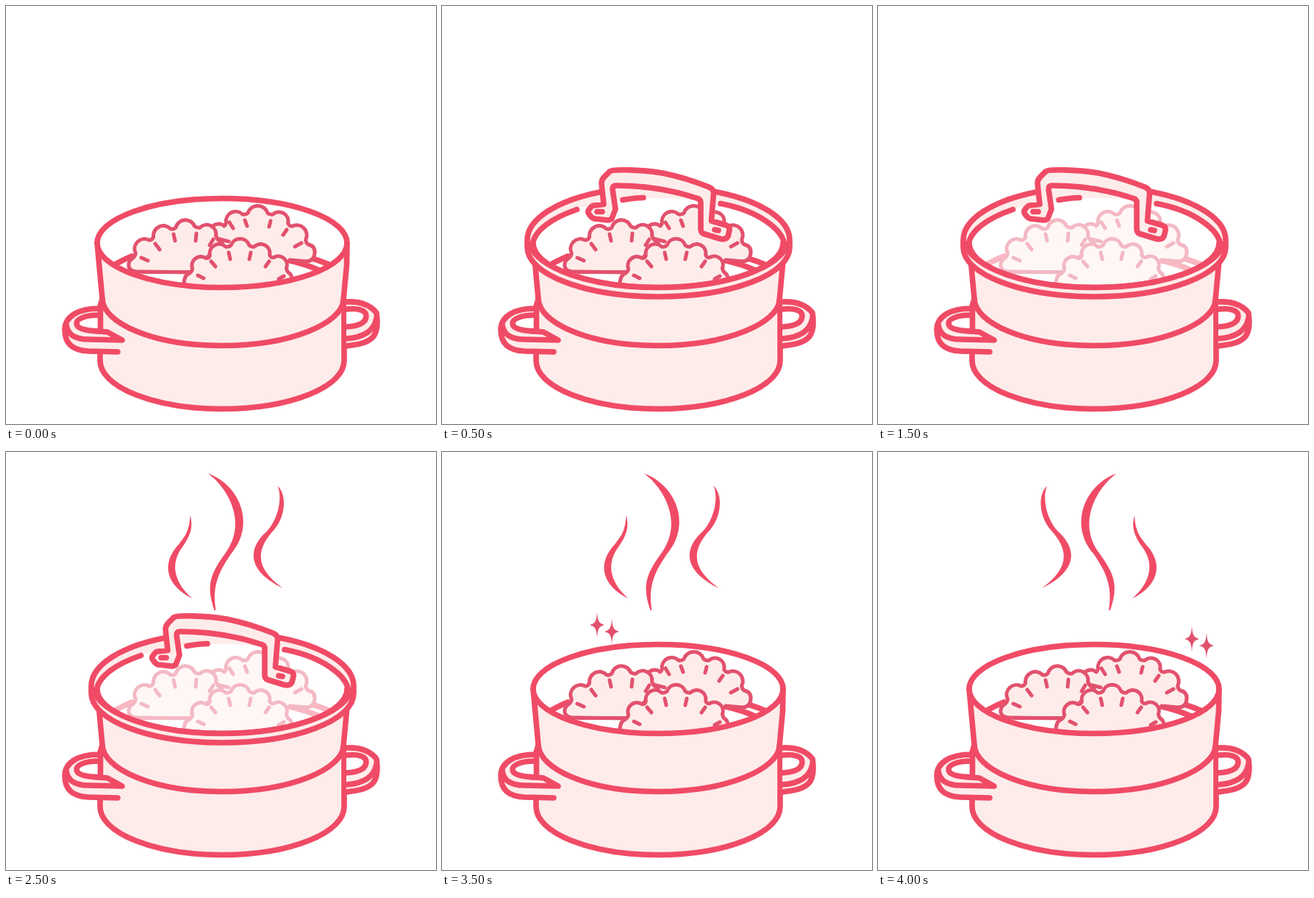
These frames come from a looping animation (585x568 px, 4500 ms). An HTML page:

```html
<!DOCTYPE html>
<html lang="en">
<head>
<meta charset="utf-8">
<title>Steaming dumplings</title>
<style>
  html, body { margin: 0; width: 100%; height: 100%; overflow: hidden; background: #fff; }
  svg { display: block; width: 100%; height: 100%; }
  .line { fill: none; stroke: #f04b66; stroke-width: 7.6; stroke-linecap: round; stroke-linejoin: round; }
  .body { fill: #fdecea; }
  .hole { fill: #fff; }
  .food { fill: #fdecea; stroke: #e2516d; stroke-width: 5; stroke-linecap: round; stroke-linejoin: round; }
  .steam { fill: #f04b66; }
  .star { fill: #e2516d; }
</style>
</head>
<body>
<svg viewBox="0 0 585 568">
  <defs>
    <path id="star" d="M0 -18.500C.6 -6 2 -2.200 10 0C2 2.200 .6 6 0 18.500C-.6 6 -2 2.200 -10 0C-2 -2.200 -.6 -6 0 -18.500Z"/>
  </defs>
  <path class="line" id="backRim" d="M124 322A170 60.500 0 0 1 464 322"/>

  <g id="food">
    <path class="line" d="M147 352Q157 346 171 340M398 339Q421 343 441 352M386 346Q409 351 428 360"/>
  </g>
  <ellipse id="veil" cx="294.5" cy="321" rx="166" ry="58" fill="#fff"/>

  <g id="pot">
    <path class="body" d="M124 325A170 60 0 0 0 464 322L460 482A166 65.500 0 0 1 128 482L130 400Z"/>
    <path class="line" d="M124 322A170 60.500 0 0 0 464 322L463.500 352L459 400L460 408V482A166 65.500 0 0 1 128 482V408L131 398L124 322"/>
    <path class="line" d="M131 398C132 430 198 461.500 294 461.500C390 461.500 457 430 459 400"/>
  </g>

  <g id="leftHandle">
    <path class="body" d="M126 411C100 411 80 421 80 440C80 460 92 468 112 469L152 470L158 454L140 443L126 441Z"/>
    <path class="line hole" d="M126 420C106 420 96 426 96 431C96 438 106 441 126 442"/>
    <path class="line" d="M126 411C100 411 80 421 80 440C80 460 92 468 112 469L152 470M82 433C84 447 94 453 112 453L158 454L138 443L120 441.500M128.500 408V441"/>
  </g>
  <g id="rightHandle">
    <path class="body" d="M463 402C484 401 497 408 504 417C506 430 505 442 500 449C492 458 480 460 463 462Z"/>
    <path class="line hole" d="M463 412C480 410 490 414 490 421C490 430 480 435 463 436"/>
    <path class="line" d="M463 402C484 401 497 408 504 417C506 430 505 442 500 449C492 458 480 460 463 462M504 424C501 441 488 450 463 452"/>
  </g>

  <g id="lid">
    <path class="body" fill-rule="evenodd" d="M116 318A178.500 73 0 0 1 473 318V328A178.500 67 0 0 1 116 328ZM124.500 322A170 61 0 0 0 464.500 322A170 61 0 0 0 124.500 322Z"/>
    <path class="line" d="M219 251.900A178.500 73 0 0 0 116 318V328A178.500 67 0 0 0 473 328V318A178.500 73 0 0 0 370 251.900"/>
    <path class="line" d="M183.500 276.500C150 288 124 305 123 326M379 268.500C430 278 465 304 466 326M246 263.500Q260 261 274 260.500M119 324C130 355 198 382.500 294 382.500C390 382.500 459 355 470 324"/>
    <path class="line body" d="M207 271L220 269.500L217 241Q217 236 221 232L228 225Q231 223 236 223C268 222 294 226 300 227C320 231 343 238 363 246Q370 249 369.500 255L366.500 292L387 298Q392 300 391 305L389 313Q386 318 379 316.500L356 309.500Q352 308 352 303V267Q352 262 346 261C310 249 275 244 237 244Q232 244 232 249L236 276L231 289Q229 291 225 291L207 289Q202 287 199 281Q198 278 202 274Q204 271 207 271Z"/>
    <path class="line" d="M211 279.500H218M371 304L376 305"/>
  </g>

  <g id="steam" class="steam">
    <path d="M230 46C217 58 219 88 235 106C263 136 257 160 223 185C265 165 276 136 245 108C232 95 222 66 230 46Z"/>
    <path d="M325 29C282 44 259 98 293 138C308 160 320 180 314 215H316C328 180 321 165 300 136C271 95 298 48 325 29Z"/>
    <path d="M349 86C344 103 350 115 358 127C378 152 370 178 346 199C381 182 390 152 364 125C358 116 350 110 349 86Z"/>
  </g>
  <g id="stars" class="star">
    <use href="#star"/>
    <use href="#star" x="20" y="9"/>
  </g>
</svg>
<script>
const $ = id => document.getElementById(id);
const STEP = 500, STEPS = 9;

function addPath(d, fill) {
  const p = document.createElementNS("http://www.w3.org/2000/svg", "path");
  p.setAttribute("class", "food");
  p.setAttribute("d", d);
  if (fill) p.style.fill = fill;
  $("food").append(p);
}

// Pleated edge: a round bump between each pair of valleys, with the valleys softened.
function dumpling(start, valleys, end, ticks) {
  const bumps = valleys.slice(1).map(([x, y], i) => {
    const [px, py] = valleys[i];
    const dx = x - px, dy = y - py;
    const at = k => [px + dx * k + dy * 0.09, py + dy * k - dx * 0.09];
    const r = Math.hypot(dx, dy) * 0.42;
    return `${at(0.1)}A${r} ${r} 0 0 1 ${at(0.9)}Q${x} ${y} `;
  });
  addPath(`${start}Q${valleys[0]} ${bumps.join("")}${end}`);
  addPath(ticks, "none");
}

dumpling("M303 320L287 316L281 299Q290 293 297 299", [[298, 299], [326, 284], [359, 284], [385, 299], [408, 322]],
  "411 324Q421 326 420 336Q419 347 408 347L386 345",
  "M304 294L309 302M325 291L328 299M360 292L358 300M382 304L377 311M402 322L393 327");

dumpling("M252 362L186 361Q169 362 167 354Q166 347 172 343", [[176, 340], [199, 318], [228, 304], [260, 302], [287, 316]],
  "288 317L294 322L252 362",
  "M184 342L193 346M203 323L209 331M228 310L230 319M259 309L258 319M282 317L277 325M186 361.500H250");

dumpling("M242 390V376Q243 365 250 363", [[253, 361], [276, 343], [303, 328], [334, 328], [360, 342], [382, 360]],
  "384 362Q389 365 389 371V390",
  "M261 366L269 370M279 347L285 354M303 335L305 344M333 335L331 344M358 347L353 354M378 367L371 371");

const show = (id, on) => $(id).style.display = on ? "" : "none";

function draw(time) {
  const step = Math.floor(time / STEP) % STEPS;
  const covered = step >= 1 && step <= 6;
  show("lid", covered);
  show("backRim", !covered);
  $("veil").setAttribute("opacity", !covered || step === 1 ? 0 : step === 2 ? 0.35 : 0.6);

  show("steam", step >= 5);
  $("steam").setAttribute("transform", step % 2 ? "translate(599.5 0) scale(-1 1)" : "");

  show("stars", step >= 7);
  $("stars").setAttribute("transform", step === 7 ? "translate(211 235)" : "translate(427 254)");
}

const began = performance.now();
function tick() {
  draw(performance.now() - began);
  requestAnimationFrame(tick);
}
tick();
</script>
</body>
</html>
```
